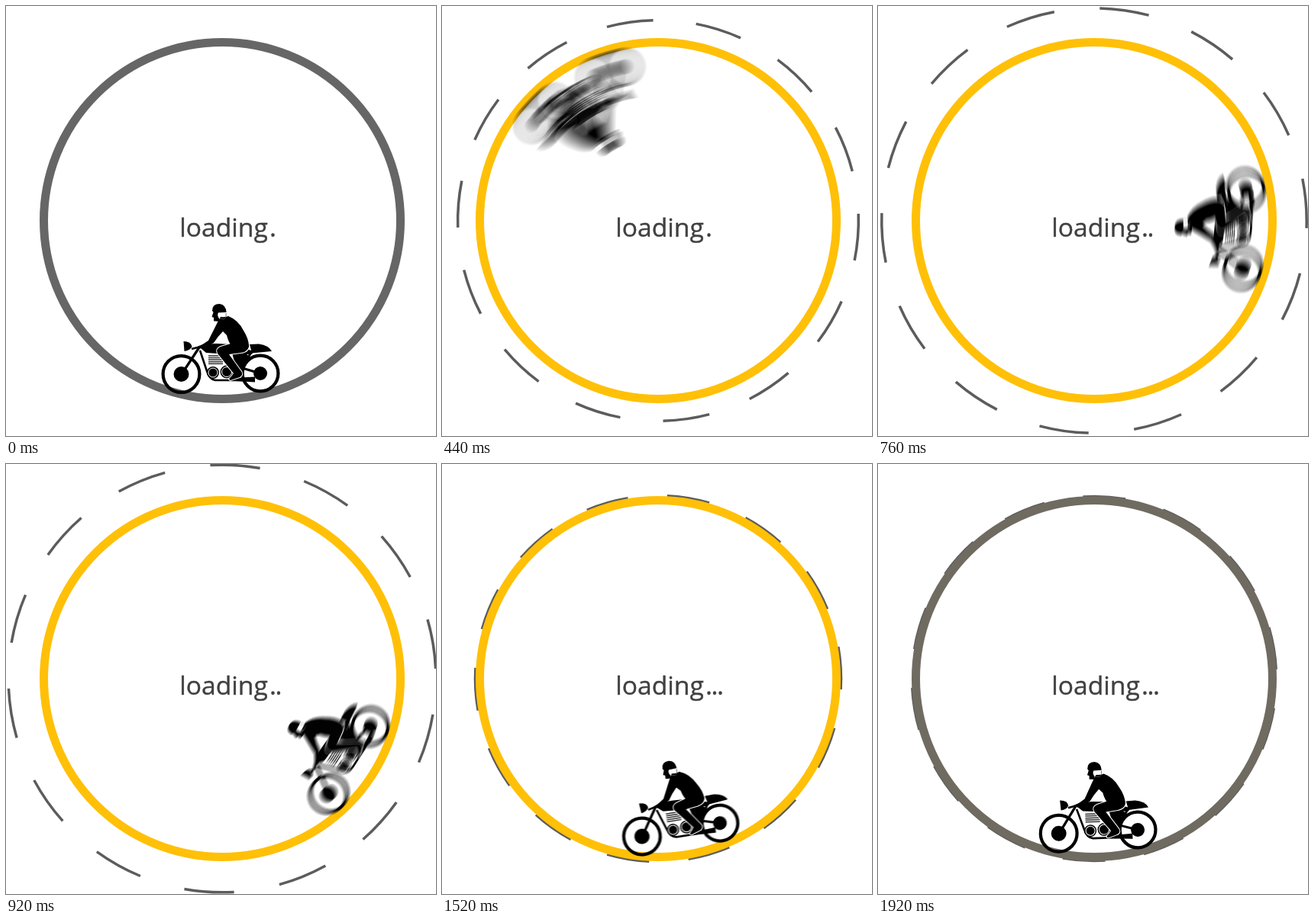
An HTML page with a canvas that plays this animation: 563x563 px, repeating every 1.96 s.

```html
<!DOCTYPE html>
<html lang="en">
<head>
<meta charset="utf-8">
<title>Loading</title>
<style>
html, body { margin: 0; width: 100%; height: 100%; overflow: hidden; background: #fff; }
canvas, svg { position: absolute; left: 0; top: 0; width: 563px; height: 563px; }
text { font: 33.6px "Open Sans", "Noto Sans", sans-serif; fill: #404040; stroke: #404040; stroke-width: 0.4px; white-space: pre; }
#dots { letter-spacing: -1.4px; }
</style>
</head>
<body>
<canvas id="stage" width="563" height="563"></canvas>
<svg viewBox="0 0 563 563"><text x="227.3" y="301.5">loading</text><text id="dots" x="345" y="301.5">.</text></svg>
<script>
const SIZE = 563, LOOP = 1960, STEP = 40, SHUTTER = 20;
const CX = 283, CY = 281, RING = 233.5;
const PIVOT_X = 280.5, PIVOT_Y = 282;
const DEG = Math.PI / 180;
const GRAY = [102, 102, 102], YELLOW = [255, 192, 7];

function makeLayer() {
  const c = document.createElement('canvas');
  c.width = c.height = SIZE;
  return c.getContext('2d');
}
const ctx = document.getElementById('stage').getContext('2d');
const dots = document.getElementById('dots');
const bike = makeLayer(), blur = makeLayer();

const clamp = (v) => Math.min(1, Math.max(0, v));
const mix = (a, b, k) => a + (b - a) * k;

// Cubic bezier easing (1/3, 0, 0, 1): quick start, very long settle.
function ease(x) {
  x = clamp(x);
  let lo = 0, hi = 1;
  for (let i = 0; i < 30; i++) {
    const s = (lo + hi) / 2;
    if (s * (1 - s) * (1 - s) + s * s * s < x) lo = s; else hi = s;
  }
  return lo * lo * (3 - 2 * lo);
}

// Piecewise linear value through [time, value] pairs.
function track(keys, t) {
  let i = 0;
  while (i < keys.length - 2 && t > keys[i + 1][0]) i++;
  const [t0, a] = keys[i], [t1, b] = keys[i + 1];
  return mix(a, b, (t - t0) / (t1 - t0));
}

const TURN = [[600, 12.9], [920, 3.5], [1200, -7.1], [1520, -16.2], [1920, -22.5]];
const rideAngle = (t) => 358 * ease(t / LOOP);
const dashRadius = (t) => t < 1150
  ? mix(233, 280, ease((t - 200) / 800))
  : mix(280, 238.5, ease((t - 1150) / 490));
const warmth = (t) => Math.min(clamp(t / 360), clamp((LOOP - 20 - t) / 360));

function fill(d, color = '#000') {
  bike.fillStyle = color;
  bike.fill(new Path2D(d));
}
function line(d, width, color = '#000') {
  bike.lineWidth = width;
  bike.strokeStyle = color;
  bike.stroke(new Path2D(d));
}
function circle(x, y, r, width, color = '#000') {
  bike.lineWidth = width;
  bike.strokeStyle = color;
  bike.beginPath();
  bike.arc(x, y, r, 0, 7);
  bike.stroke();
}
function disc(x, y, r, color = '#000') {
  bike.fillStyle = color;
  bike.beginPath();
  bike.arc(x, y, r, 0, 7);
  bike.fill();
}
function wheel(x, y, r, hub) {
  circle(x, y, r - 2.1, 4.2);
  disc(x, y, hub);
}

function drawMachine() {
  wheel(229.5, 482, 26, 10);
  wheel(333, 481, 25.5, 9);
  line('M253 447L230 482', 3.2);
  line('M309 474L333 481', 3);
  // headlight, bars
  fill('M232.5 439Q242 439 243.5 446Q241 451 233.5 452Z');
  line('M243 449L251 447L259 444', 2.5);
  // tank, seat, tail
  fill('M256 449Q264 441 276 442L296 443L324 452L322 456L290 456L262 454Z');
  fill('M319 443L331 442.5Q344 444 348 452L322 454.5Z');
  // frame, engine
  line('M254 451L263 478Q266 489 274 490L312 490', 2.6);
  line('M320 455L309 475L300 488', 3);
  fill('M296 454L314 455L320 460Q310 466 309 480L300 470Z');
  for (let y = 458; y < 471; y += 2.6) line(`M265 ${y}H284`, 1.5, '#333');
  disc(271, 480, 8);
  disc(289, 479, 8.5);
  circle(271, 480, 6, 1, '#fff');
  circle(289, 479, 6.5, 1, '#fff');
  fill('M298 487L326 485.5V492.5L300 491Z');
}

function drawRider() {
  // leg with a light edge
  const leg = 'M318 443Q319 452 308 454L292 456L307 477Q312 483 306 486L294 490' +
    'Q290 489 295 485L298 481L277 455Q274 449 281 446L298 441Z';
  line(leg, 2, '#fff');
  fill(leg);
  // torso and arm
  fill('M281 407Q287 408 291 406Q304 411 311 425Q318 436 318 446L296 446' +
    'Q291 440 289 431L284 426Q277 433 272 441L258 449Q253 449 253 446' +
    'L265 438Q272 424 277 414Z');
  // head
  fill('M270 399Q270 390 279.5 390Q288 391 288.5 401L278 401.5Q276 405 279 409' +
    'L279 413L272 412.5L272 408L269.5 407L271.5 401Z');
  line('M288 402Q289 408 285 410L280 409', 0.8, '#555');
}

// Average of several poses while the shutter is open.
function drawBike(t) {
  const spread = rideAngle(t + SHUTTER / 2) - rideAngle(t - SHUTTER / 2);
  const n = Math.max(1, Math.min(24, Math.ceil(spread * 3.5)));
  blur.clearRect(0, 0, SIZE, SIZE);
  blur.globalCompositeOperation = 'lighter';
  blur.globalAlpha = 1 / n;
  for (let i = 0; i < n; i++) {
    const a = rideAngle(t + ((i + 0.5) / n - 0.5) * SHUTTER);
    bike.setTransform(1, 0, 0, 1, 0, 0);
    bike.clearRect(0, 0, SIZE, SIZE);
    bike.translate(PIVOT_X, PIVOT_Y);
    bike.rotate(a * DEG);
    bike.translate(-PIVOT_X, -PIVOT_Y);
    drawMachine();
    drawRider();
    blur.drawImage(bike.canvas, 0, 0);
  }
  ctx.drawImage(blur.canvas, 0, 0);
}

function arc(r, from, to, width, color) {
  ctx.lineWidth = width;
  ctx.strokeStyle = color;
  ctx.beginPath();
  ctx.arc(CX, CY, r, from * DEG, to * DEG);
  ctx.stroke();
}

function draw(t) {
  ctx.fillStyle = '#fff';
  ctx.fillRect(0, 0, SIZE, SIZE);

  const r = dashRadius(t), turn = track(TURN, t) - 90;
  for (let i = 0; i < 14; i++) {
    const mid = turn + i * 360 / 14;
    arc(r, mid - 6.7, mid + 6.7, 3.5, '#5c5c5c');
  }
  const k = warmth(t);
  arc(RING, 0, 360, 11, `rgb(${GRAY.map((g, i) => Math.round(mix(g, YELLOW[i], k)))})`);
  drawBike(t);

  const text = '.'.repeat(t < 680 ? 1 : t < 1320 ? 2 : 3);
  if (dots.textContent !== text) dots.textContent = text;
}

const start = performance.now();
let last = -1;
function tick(now) {
  const t = Math.floor((Math.max(0, now - start) % LOOP) / STEP) * STEP;
  if (t !== last) draw(last = t);
  requestAnimationFrame(tick);
}
tick(start);
</script>
</body>
</html>
```
